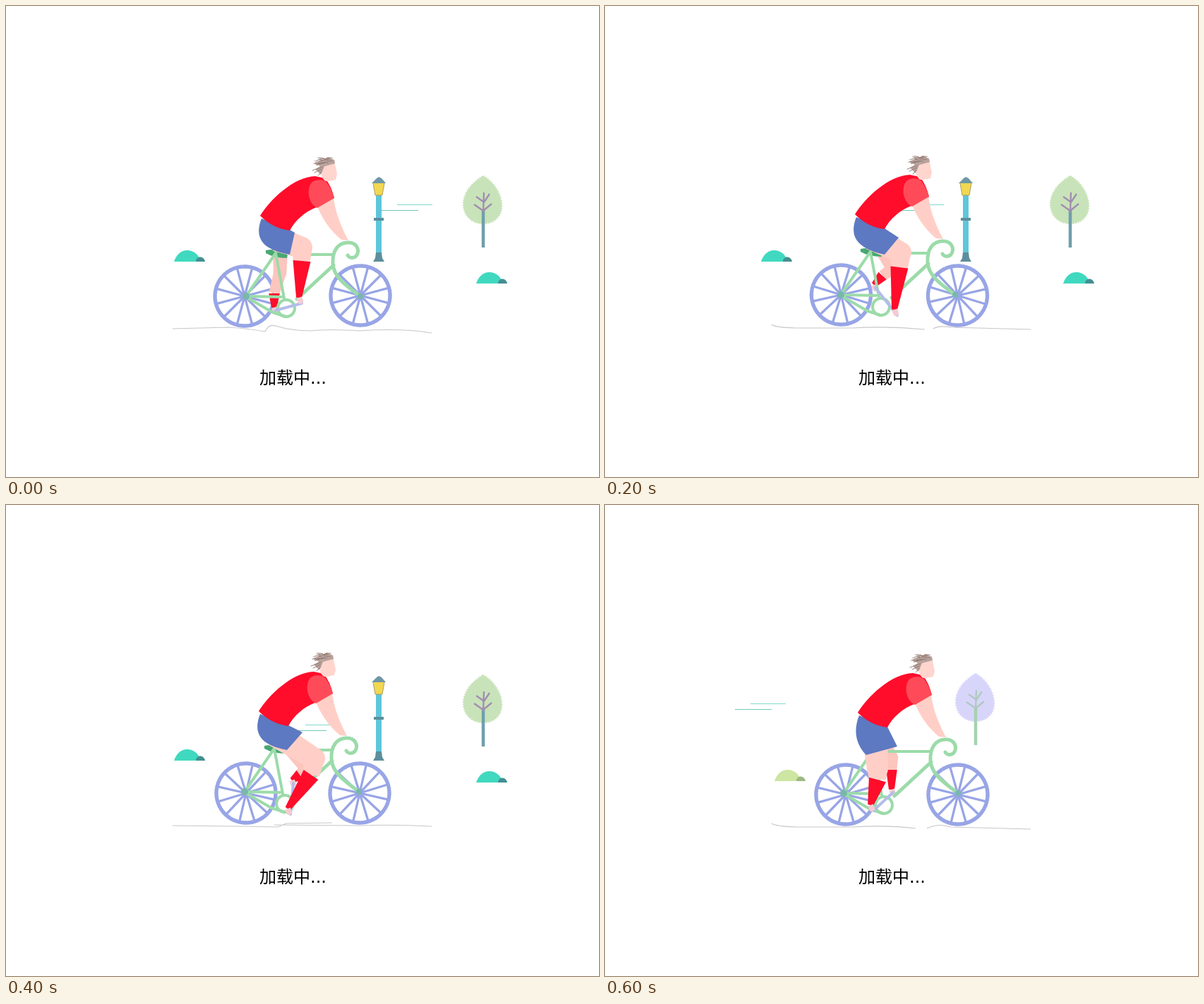
An HTML page with a canvas that plays this animation: 840 by 667 pixels, repeating every 700 ms.

```html
<!DOCTYPE html>
<html lang="zh">
<head>
<meta charset="utf-8">
<style>
html, body { margin: 0; width: 100%; height: 100%; overflow: hidden; background: #fff }
canvas { display: block }
p { position: absolute; left: 359px; top: 509px; margin: 0; color: #000; white-space: nowrap;
  font: 24px/36px "DejaVu Sans", "Noto Sans CJK SC", "Noto Sans CJK", sans-serif }
</style>
</head>
<body>
<canvas id="stage" width="840" height="667"></canvas>
<p>加载中...</p>
<script>
const c = document.getElementById('stage').getContext('2d');
const STEP = 100;
const SKIN = '#ffcfc7', RED = '#ff0d2b', GREEN = '#9bdba9', BLUE = '#98a5e6';
const TEAL = '#40d9c0', LIME = '#cde6a2', LEAF = '#c8e3b9', LILAC = '#d8d5fa';

// Each pose: body offset, wheel centres, spoke angle, shorts hem,
// then knee, sock top and ankle of the near and the far leg.
const poses = [
  { at: [0, 0], wheels: [338, 411, 502, 410], turn: 15, hem: [402, 352, 409, 321],
    near: [419, 342, 419, 361, 415, 413], far: [388, 378, 380, 407, 380, 427] },
  { at: [-3, -1], wheels: [338, 410, 501.5, 410], turn: 18, hem: [377, 348, 410, 338],
    near: [395, 362, 404, 391, 412, 420], far: [414, 364, 391, 391, 383, 411] },
  { at: [-6, -2], wheels: [334.5, 409, 499.5, 410], turn: 17, hem: [396, 352, 416, 328],
    near: [419, 349, 417, 370, 410, 430], far: [408, 372, 393, 382, 381, 395] },
  { at: [0, -5], wheels: [340, 406, 503.5, 409], turn: 15, hem: [403, 347, 423, 323],
    near: [436, 355, 427, 376, 408, 429], far: [413, 366, 404, 381, 393, 389] },
  { at: [-2, -5], wheels: [340, 408, 501, 408], turn: 13, hem: [398, 347, 420, 322],
    near: [437, 359, 432, 382, 399, 430], far: [425, 372, 416, 382, 405, 390] },
  { at: [-2, -4], wheels: [341, 408, 501, 408], turn: 14, hem: [370, 352, 415, 339],
    near: [386, 370, 385, 390, 378, 428], far: [407, 355, 408, 368, 408, 400] },
  { at: [-2, -3], wheels: [341, 410, 500, 410], turn: 14, hem: [370, 354, 414, 342],
    near: [386, 373, 386, 389, 376, 425], far: [406, 358, 406, 375, 406, 403] }
];

const park = shift => {
  bush(238 + shift, 362);
  bush(666 + shift, 393);
  lamp(528 + shift);
  tree(676 + shift);
};
const scenes = [
  () => { park(0); wind(554, 281); },
  () => { tree(279, 0, LEAF, .6); bush(270, 393, TEAL, .45); bush(609, 362, LIME, .85); wind(425, 281); },
  () => { park(-17); wind(430, 281); },
  () => {
    fill('M426 289Q436 278 444 281L448 308Q432 303 426 289Z', LILAC);
    bush(168, 393, LIME, .85); bush(586, 362, TEAL, .7); wind(554, 281);
  },
  () => { park(0); wind(424, 311); },
  () => { tree(234, 0, LEAF, .65); bush(224, 393, TEAL, .65); bush(619, 362, LIME, .9); wind(554, 281); },
  () => { tree(525, -2, LILAC); bush(240, 391, LIME); wind(206, 281); }
];
const grounds = [
  'M236 457L315 455Q345 457 367 461Q372 450 382 453Q405 460 432 460Q460 457 500 460Q560 456 603 463',
  'M236 452L310 452Q345 456 383 453M398 453Q440 457 475 455Q560 453 603 459',
  'M236 451Q240 455 270 456L350 456Q400 453 453 458M465 457Q473 452 490 455L603 458',
  'M238 454Q246 449 270 451L355 454Q410 455 440 453M460 455Q480 459 520 456L600 461',
  'M236 454L330 455L385 456L397 451L462 450M380 453L500 454Q550 452 603 455',
  'M236 451Q242 455 270 456L350 456Q400 453 440 459M456 458Q472 451 490 456L603 459',
  'M236 451Q242 455 270 456L350 456Q400 453 440 458M456 458Q472 450 490 456L603 459'
];

function fill(d, color) {
  c.fillStyle = color;
  c.fill(new Path2D(d));
}

function line(d, color, width = 1) {
  c.strokeStyle = color;
  c.lineWidth = width;
  c.stroke(new Path2D(d));
}

function placed(x, y, draw, alpha = 1) {
  c.save();
  c.translate(x, y);
  c.globalAlpha *= alpha;
  draw();
  c.restore();
}

// Tapered limb between two points
function limb(x1, y1, x2, y2, w1, w2, color, round = true) {
  const a = Math.atan2(y2 - y1, x2 - x1), nx = -Math.sin(a) / 2, ny = Math.cos(a) / 2;
  c.fillStyle = color;
  c.beginPath();
  c.moveTo(x1 + nx * w1, y1 + ny * w1);
  c.lineTo(x2 + nx * w2, y2 + ny * w2);
  if (round) c.arc(x2, y2, w2 / 2, a + Math.PI / 2, a - Math.PI / 2, true);
  else c.lineTo(x2 - nx * w2, y2 - ny * w2);
  c.lineTo(x1 - nx * w1, y1 - ny * w1);
  c.fill();
}

function bush(x, y, color = TEAL, alpha = 1) {
  placed(x, y, () => {
    fill('M0 0C4 -12 12 -17 20 -16C30 -15 35 -9 38 0Z', color);
    fill('M31 0C31 -8 42 -9 44 0Z', color == TEAL ? '#448f92' : '#9cba82');
  }, alpha);
}

function crown(color) {
  const d = 'M0 241C13 248 26 265 26 283C26 299 14 308 0 308C-16 308 -28 297 -28 280C-27 262 -14 249 0 241Z';
  fill(d, color);
  c.setLineDash([2, 1.6]);
  line(d, color, 2.5);
  c.setLineDash([]);
}

function tree(x, y = 0, color = LEAF, alpha = 1) {
  const lilac = color == LILAC;
  placed(x, y, () => {
    crown(color);
    line('M0 289L0 342', lilac ? '#a5d3b0' : '#6f9fad', 4.5);
    line('M0 292L1 264M0 277L-10 270M1 278L9 266M0 290L-13 281M0 290L12 280', lilac ? '#b0c9c0' : '#a18db0', 2.3);
  }, alpha);
}

function lamp(x) {
  placed(x, 0, () => {
    fill('M-4 268H4V352H-4Z', '#5fc6da');
    fill('M-4 349H4L5 357L8 362H-8L-5 357ZM-7 300H7V304H-7Z', '#5d8e9b');
    fill('M-8 251H8L5 268H-5Z', '#f2d751');
    line('M-8 251L-5 268H5L8 251', '#a99d62', 1);
    fill('M-10 251L-3 244L0 242L4 244L10 251Z', '#6f98a6');
  });
}

function wind(x, y) {
  line(`M${x} ${y + .5}h50`, '#83d8cb', 1.2);
  line(`M${x - 22} ${y + 8.5}h52`, '#6fc9b6', 1.2);
}

function wheel(x, y, turn) {
  placed(x, y, () => {
    for (let i = 0; i < 12; i++) {
      const a = (i * 30 + turn) * Math.PI / 180;
      line(`M0 0L${41 * Math.cos(a)} ${41 * Math.sin(a)}`, BLUE, 3.3);
    }
    c.strokeStyle = BLUE;
    c.lineWidth = 4;
    c.beginPath();
    c.arc(0, 0, 42, 0, 7);
    c.stroke();
    c.setLineDash([3, 2]);
    c.lineWidth = 5.4;
    c.stroke();
  });
}

function bike() {
  fill('M368 346Q382 343 399 350L398 357Q380 357 368 350Z', '#47a873');
  line('M340 411L382 350L394 414M340 411L390 412M340 412L378 434L397 440M404 352H463', GREEN, 4);
  line('M464 367L412 415M502 411C480 395 464 383 463 365C462 347 470 335 485 335C497 335 502 346 496 354C492 358 486 357 484 353', GREEN, 5);
  line('M409 428a12 12 0 1 1 -24 0a12 12 0 1 1 24 0', GREEN, 4);
  fill('M335 411a5 5 0 1 1 10 0a5 5 0 1 1 -10 0M498 411a4 4 0 1 1 8 0a4 4 0 1 1 -8 0', '#79b7ad');
}

function leg(hx, hy, [kx, ky, sx, sy, ax, ay], size, color) {
  limb(hx, hy, kx, ky, 36 * size, 30 * size, color);
  limb(kx, ky, sx, sy, 29 * size, 24 * size, color, false);
  limb(sx, sy, ax, ay, 25 * size, 8, RED, false);
  limb(ax, ay, ax + 2, ay + 5, 8, 8, '#f5cbd3');
}

function torso() {
  fill('M360 297C375 273 408 242 438 241L452 244Q461 255 465 272L440 285C424 291 410 303 402 318Q378 315 360 297Z', RED);
  fill('M441 284L464 272C467 295 477 317 485 332L475 331C459 318 448 301 441 284Z', SKIN);
  fill('M433 250C440 244 451 246 455 251Q462 261 465 272L441 286C428 280 425 259 433 250Z', '#ff4b59');
}

function head() {
  fill('M448 225L465 219L469 238L467 246L457 248Q451 250 447 241Z', '#ffd5ce');
  fill('M437 222L447 219L456 214L465 218L466 223L451 227L446 239L438 231L445 227Z', '#b7a09a');
  let seed = 5;
  const rnd = () => (seed = seed * 16807 % 2147483647) / 2147483647;
  for (let i = 0; i < 26; i++) {
    const x = 446 + 19 * rnd(), y = 215 + 10 * rnd();
    line(`M${x} ${y}q-6 ${3 * rnd() - 2} ${-6 - 7 * rnd()} ${5 * rnd() - 1}`, i % 2 ? '#8e746d' : '#bca9a4', .9);
  }
  line('M448 228L434 233M447 231L437 236M448 234L442 240', '#95807b', 1);
}

function rider({ at: [dx, dy], hem: [bx, by, fx, fy], near, far }) {
  const hx = 384 + dx, hy = 330 + dy;
  leg(hx + 5, hy, far, .62, '#fcc5bd');
  placed(dx, dy, bike);
  line(`M${far[4] + 2} ${far[5] + 4}L${near[4] + 4} ${near[5] + 8}`, '#b3bde9', 4);
  leg(hx, hy, near, 1, SKIN);
  fill(`M${362 + dx} ${301 + dy}C${352 + dx} ${326 + dy} ${360 + dx} ${345 + dy} ${bx} ${by}
    L${fx} ${fy}L${402 + dx} ${317 + dy}Z`, '#5d79c1');
  placed(dx, dy, () => { torso(); head(); });
}

function draw(i) {
  const pose = poses[i], [rx, ry, fx, fy] = pose.wheels;
  c.clearRect(0, 0, 840, 667);
  c.lineCap = 'butt';
  scenes[i]();
  line(grounds[i], '#c9c5c8', 1.1);
  c.lineCap = c.lineJoin = 'round';
  wheel(rx, ry, pose.turn);
  wheel(fx, fy, pose.turn);
  rider(pose);
}

const start = performance.now();
function tick() {
  draw(Math.floor((performance.now() - start) / STEP) % poses.length);
  requestAnimationFrame(tick);
}
tick();
</script>
</body>
</html>
```
